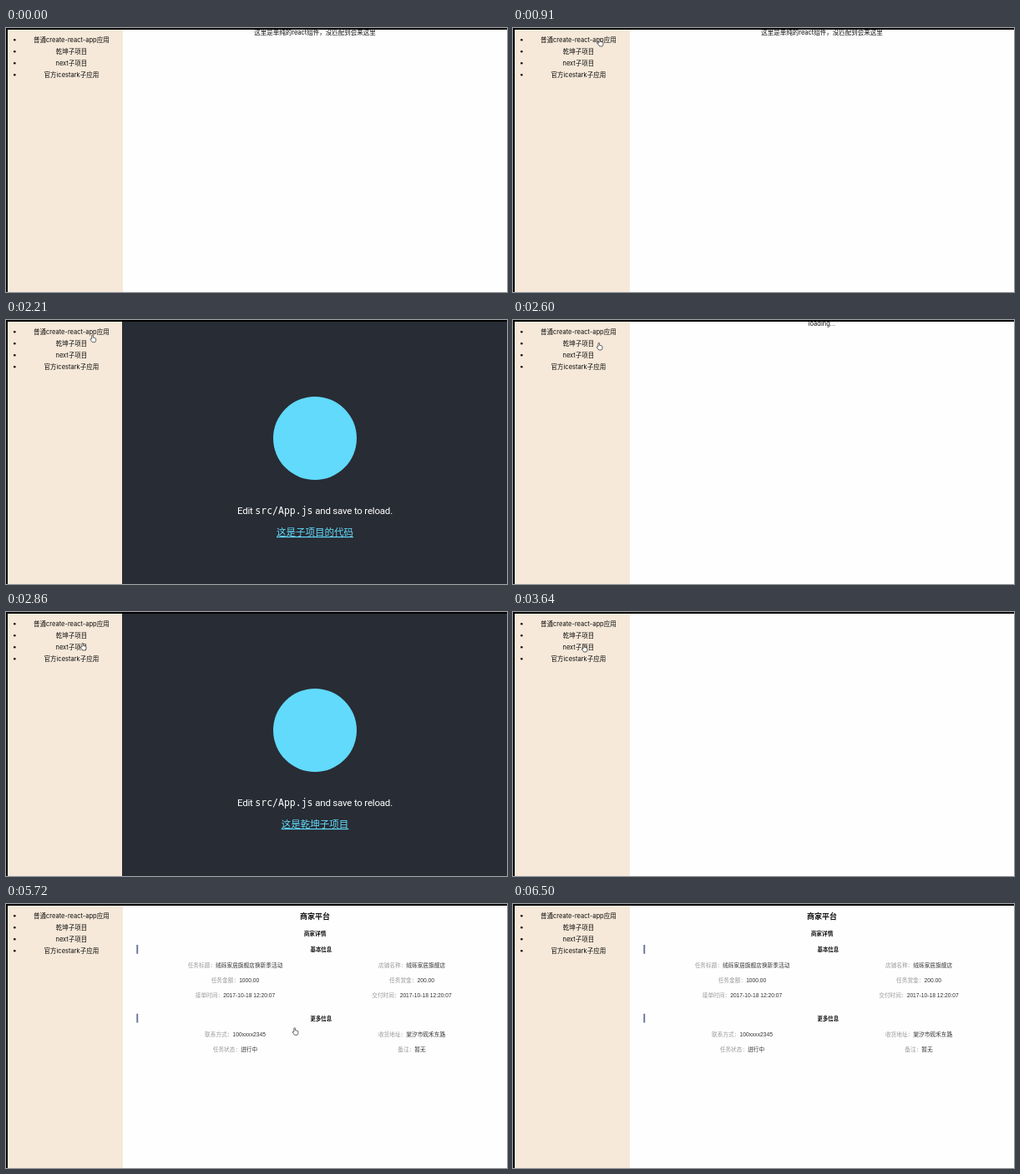
An HTML page for the animation above (7800 ms loop, 600x317 px).

```html
<!DOCTYPE html>
<html lang="zh-CN">
<head>
<meta charset="utf-8">
<title>子应用切换</title>
<style>
html, body { margin: 0; width: 100%; height: 100%; overflow: hidden; background: #fefefe; }
svg { display: block; width: 100%; height: 100%; }
text { font: 7.5px Inter, "Noto Sans CJK SC", "Noto Sans CJK", sans-serif; fill: #0c0c0c; text-anchor: middle; }
.scene { visibility: hidden; }
#app text { font: 11.5px Roboto, "Noto Sans CJK SC", "Noto Sans CJK", sans-serif; fill: #fff; }
#app .tight { letter-spacing: -0.2px; }
#app .code { font-family: "DejaVu Sans Mono", monospace; }
#app .link { fill: #61dafb; text-decoration: underline; }
#shop text { font: 6.7px "Liberation Sans", "Noto Sans CJK SC", "Noto Sans CJK", sans-serif; fill: #333; }
#shop .label { fill: #999; }
#shop .head { font-weight: 700; font-size: 6.4px; fill: #111; }
#shop .sub { font-weight: 700; fill: #111; }
#shop .title { font-weight: 700; font-size: 9px; fill: #111; }
</style>
</head>
<body>
<svg viewBox="0 0 600 317" preserveAspectRatio="none">
  <rect width="600" height="317" fill="#fefefe"/>
  <rect width="140" height="317" fill="#f6e9d9"/>
  <g id="menu"></g>

  <g id="home" class="scene">
    <text x="370" y="8">这里是单纯的react组件，没匹配到会来这里</text>
  </g>
  <g id="loading" class="scene">
    <text x="370" y="7">loading...</text>
  </g>
  <g id="app" class="scene">
    <rect x="139" width="461" height="317" fill="#282c34"/>
    <circle cx="370" cy="142" r="50" fill="#61dafb"/>
    <text x="370" y="233"><tspan class="tight">Edit </tspan><tspan class="code">src/App.js</tspan><tspan class="tight"> and save to reload.</tspan></text>
    <text id="link" class="link" x="370" y="259"></text>
  </g>
  <g id="shop" class="scene">
    <text class="title" x="370" y="18.4">商家平台</text>
    <text class="sub" x="370" y="37.6">商家详情</text>
  </g>

  <path d="M0 0H600V2H2V317H0Z" fill="#000"/>
  <path id="hand" d="M2 5V1.2a.8.8 0 0 1 1.6 0V3.4l2.6.6q.8.2.8 1V7L6 9H2.8L.4 5.8q-.2-.9.6-.8z"
        fill="#fff" stroke="#222" stroke-width=".7" stroke-linejoin="round"/>
</svg>
<script>
const LOOP = 7800, TICK = 130;
const $ = id => document.getElementById(id);

function add(parent, tag, attrs, text = '') {
  const el = document.createElementNS('http://www.w3.org/2000/svg', tag);
  for (const k in attrs) el.setAttribute(k, attrs[k]);
  el.textContent = text;
  parent.append(el);
  return el;
}

['普通create-react-app应用', '乾坤子项目', 'next子项目', '官方icestark子应用'].forEach((name, i) => {
  const y = 14 + i * 14;
  add($('menu'), 'circle', { cx: 10.3, cy: y + .2, r: 1.3, fill: '#000' });
  add($('menu'), 'text', { x: 78.4, y: y + 2.8 }, name);
});

function field(x, y, label, value) {
  const line = add($('shop'), 'text', { x, y: y + 2.4 });
  add(line, 'tspan', { class: 'label' }, label + '：');
  add(line, 'tspan', {}, value);
}

function section(y, title, rows) {
  add($('shop'), 'rect', { x: 156.3, y: y - 5.5, width: 1.9, height: 10.8, fill: '#66759f' });
  add($('shop'), 'text', { class: 'head', x: 377.3, y: y + 2.4 }, title);
  rows.forEach(([a, b, c, d], i) => {
    const rowY = y + 19.3 + i * 17.7;
    field(274.5, rowY, a, b);
    field(486, rowY, c, d);
  });
}

section(54.5, '基本信息', [
  ['任务标题', '绒砾家居旗舰店换新季活动', '店铺名称', '绒砾家居旗舰店'],
  ['任务金额', '1000.00', '任务赏金', '200.00'],
  ['接单时间', '2017-10-18 12:20:07', '交付时间', '2017-10-18 12:20:07']
]);
section(137.2, '更多信息', [
  ['联系方式', '100xxxx2345', '收货地址', '棠汐市砚禾东路'],
  ['任务状态', '进行中', '备注', '暂无']
]);

// start time, scene, link text
const scenes = [
  [0, 'home'],
  [1430, 'loading'],
  [1560, 'app', '这是子项目的代码'],
  [2600, 'loading'],
  [2860, 'app', '这是乾坤子项目'],
  [3640, 'blank'],
  [4680, 'loading'],
  [4810, 'shop']
];

// time, x, y of the pointer
const path = [
  [520, 425, 305], [910, 101, 13], [2080, 101, 13], [2470, 100, 27],
  [2859, 100, 27], [2860, 89, 37], [3380, 82, 39], [3770, 82, 39],
  [4290, 88, 54], [4679, 88, 54], [4680, 290, 43], [5330, 330, 120],
  [5590, 330, 120], [6500, 420, 318]
];

function pointAt(t) {
  const i = path.findIndex(p => p[0] > t);
  if (i < 1) return null;
  const [t0, x0, y0] = path[i - 1], [t1, x1, y1] = path[i];
  const k = (t - t0) / (t1 - t0);
  return [x0 + (x1 - x0) * k, y0 + (y1 - y0) * k];
}

const groups = document.querySelectorAll('.scene');

function draw(time) {
  const t = Math.floor((time % LOOP) / TICK) * TICK;
  const [, name, link] = scenes.filter(s => s[0] <= t).pop();
  groups.forEach(g => g.style.visibility = g.id === name ? 'visible' : 'hidden');
  if (link && $('link').textContent !== link) $('link').textContent = link;
  const p = pointAt(t);
  $('hand').style.visibility = p ? 'visible' : 'hidden';
  if (p) $('hand').setAttribute('transform', `translate(${p})`);
}

const start = performance.now();
function loop() {
  draw(performance.now() - start);
  requestAnimationFrame(loop);
}
loop();
</script>
</body>
</html>
```
